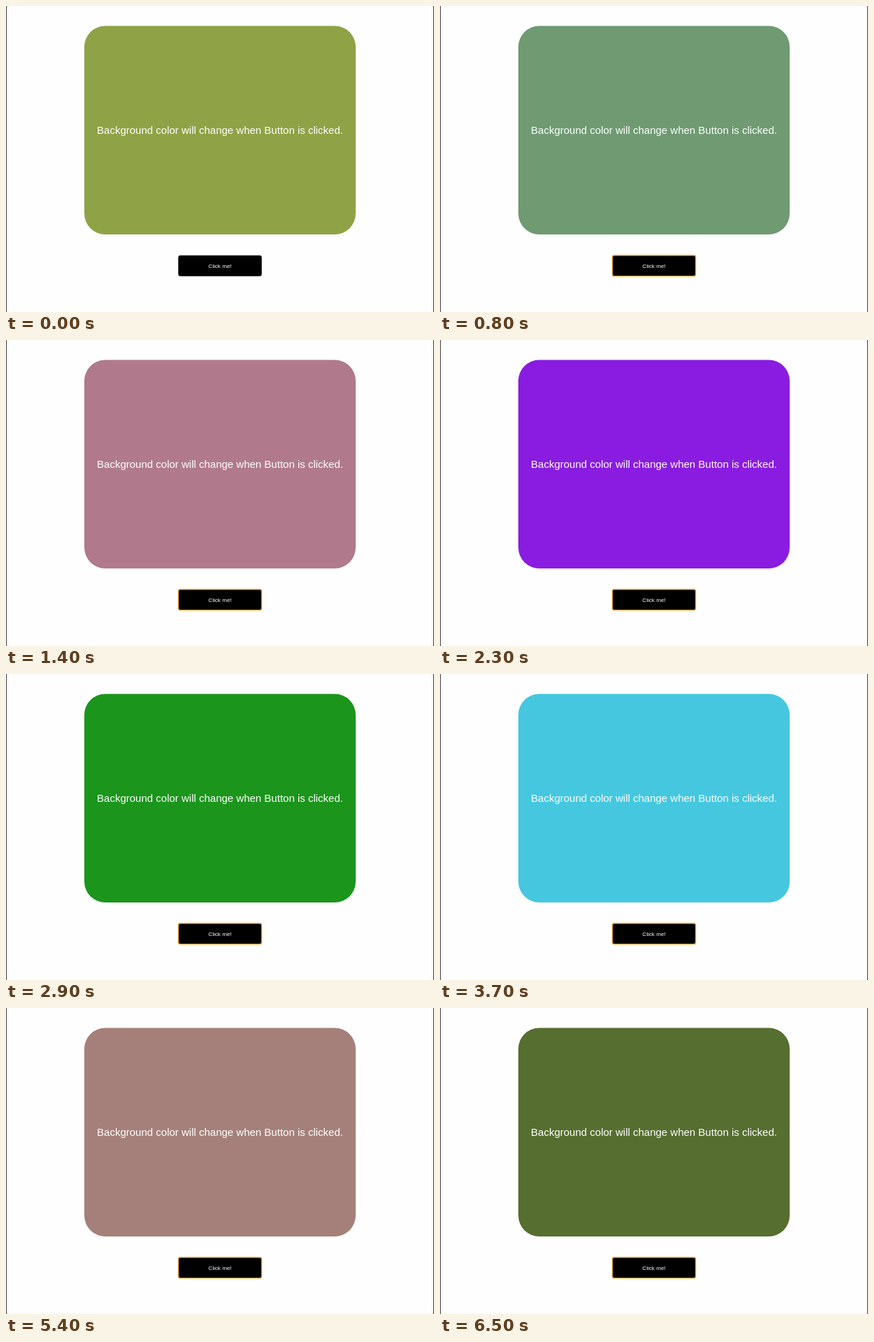
Animation of 612 by 438 pixels, one loop 7.3 s. Source, as an HTML page:

```html
<!DOCTYPE html>
<html lang="en">
<head>
<meta charset="utf-8">
<title>Background color changer</title>
<style>
  html, body { margin: 0; width: 100%; height: 100%; overflow: hidden; background: #fefefe; }
  svg { display: block; width: 612px; height: 438px; }
  text { font-family: "Liberation Sans", Arial, sans-serif; fill: #fff; text-anchor: middle; }
  .title { font-size: 15px; }
  .label { font-size: 8.1px; }
  .edge { fill: #3c3c3c; }
  .panel { animation: clicks 7.3s step-end infinite; }
  .ring { fill: none; stroke: #e39a2c; stroke-width: 1.4; animation: focus 7.3s step-end infinite; }

  /* each stop is one click on the button */
  @keyframes clicks {
    0% { fill: #8fa246; }
    9.58% { fill: #6f9a72; }
    15.06% { fill: #99ff80; }
    17.80% { fill: #b07a8c; }
    24.65% { fill: #7d8fb0; }
    31.50% { fill: #891ce0; }
    35.61% { fill: #a0608a; }
    39.72% { fill: #1b951b; }
    43.83% { fill: #8a7a9c; }
    47.94% { fill: #6c9a8e; }
    50.68% { fill: #45c7e0; }
    56.16% { fill: #9c7fa0; }
    58.90% { fill: #7c9a68; }
    63.01% { fill: #d98214; }
    65.75% { fill: #7f86a8; }
    72.60% { fill: #a5807a; }
    80.82%, 100% { fill: #566e2f; }
  }
  @keyframes focus {
    0% { opacity: 0; }
    9.58%, 100% { opacity: 1; }
  }
</style>
</head>
<body>
<svg viewBox="0 0 612 438">
  <rect class="edge" width="1" height="438"/>
  <rect class="edge" x="611" width="1" height="438"/>
  <rect class="panel" x="112" y="28.5" width="388" height="298.5" rx="30"/>
  <text class="title" x="306" y="183">Background color will change when Button is clicked.</text>
  <rect x="246.3" y="357" width="119.4" height="29.8" rx="3"/>
  <rect class="ring" x="246.5" y="357" width="119" height="29.6" rx="2.5"/>
  <text class="label" x="306" y="374.7">Click me!</text>
</svg>
</body>
</html>
```
